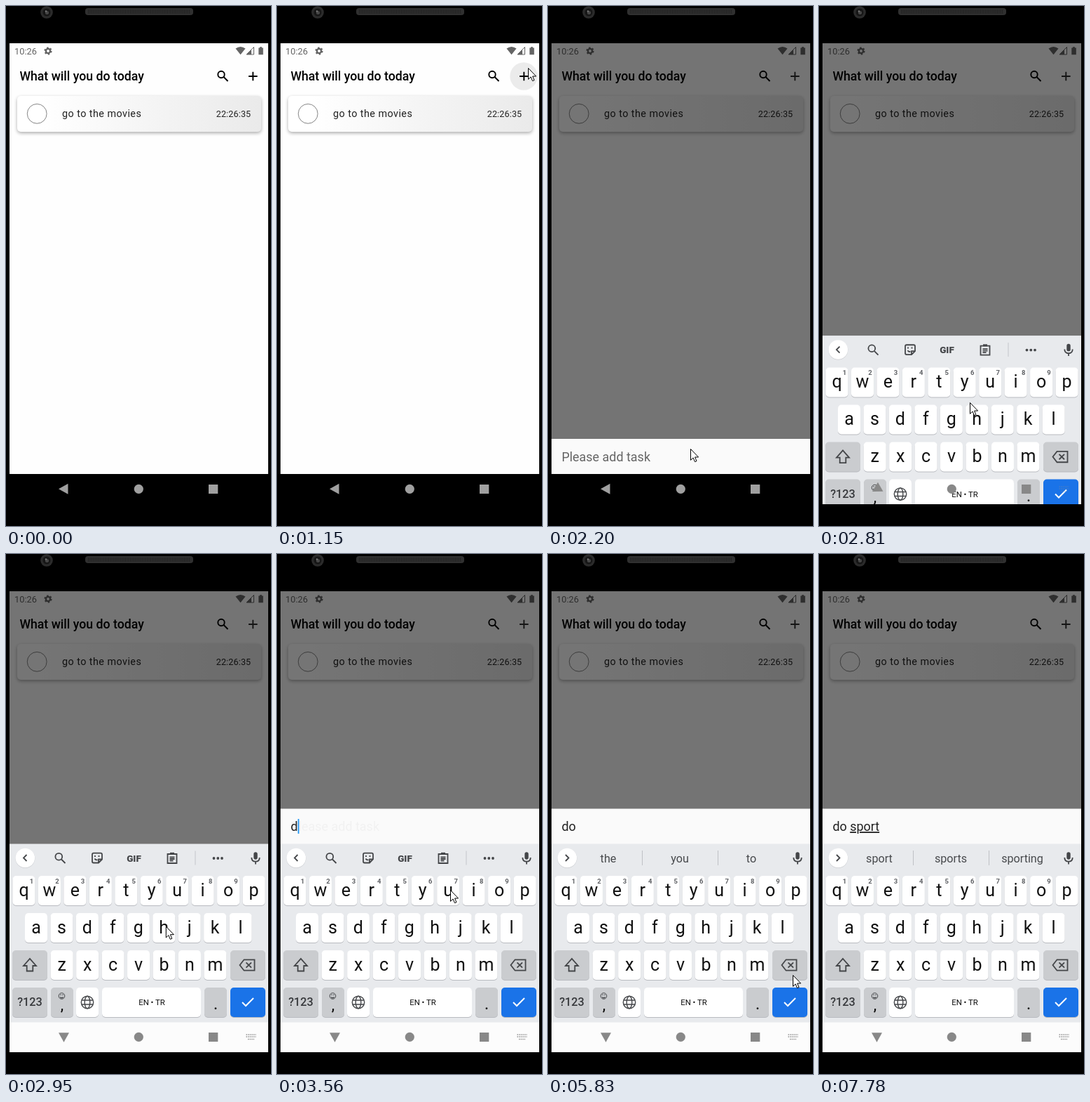
These frames come from a looping animation (378x740 px, 8000 ms). An HTML page:

```html
<!DOCTYPE html>
<html lang="en">
<head>
<meta charset="utf-8">
<title>To-do app</title>
<style>
html, body { margin: 0; width: 100%; height: 100%; overflow: hidden; background: #000; }
svg { display: block; width: 100vw; height: 100vh; }
text { font-family: Roboto, sans-serif; white-space: pre; }
.mid { text-anchor: middle; }
.line { fill: none; stroke: #444649; stroke-width: 1.8; }
.word { font-size: 16.16px; fill: #484a4d; text-anchor: middle; }
.entry { font-size: 17.96px; }
</style>
</head>
<body>
<svg viewBox="0 0 378 740">
  <defs>
    <linearGradient id="sheen">
      <stop offset=".1" stop-color="#fff"/><stop offset="1" stop-color="#eaeaea"/>
    </linearGradient>
    <filter id="soft" x="-10%" y="-40%" width="120%" height="180%"><feGaussianBlur stdDeviation="2.6"/></filter>
    <clipPath id="bar"><rect x="5" y="53" width="369" height="72"/></clipPath>
    <clipPath id="app"><rect x="5" y="53" width="369" height="613"/></clipPath>
    <clipPath id="glass"><rect x="5" y="53" width="369" height="656"/></clipPath>
  </defs>
  <rect width="378" height="740"/>

  <!-- phone body -->
  <circle cx="58" cy="9" r="8.8" fill="#2b2b2b"/>
  <circle cx="58" cy="9" r="5.5" fill="#161616"/>
  <circle cx="58.5" cy="9.5" r="2.6" fill="#454545"/>
  <circle cx="57" cy="7.5" r="1.2" fill="#777"/>
  <rect x="113" y="3" width="154" height="10" rx="4" fill="#303030"/>
  <path d="M117 6H263M117 8H263M117 10H263" stroke="#151515" stroke-dasharray="1.2 1.2"/>

  <!-- app -->
  <g clip-path="url(#app)">
    <rect x="5" y="53" width="369" height="613" fill="#fefefe"/>
    <g fill="#646464">
      <text x="12" y="68.8" font-size="12.8">10:26</text>
      <circle cx="60" cy="64" r="3.1" fill="none" stroke="#646464" stroke-width="2.4"/>
      <circle cx="60" cy="64" r="4.6" fill="none" stroke="#646464" stroke-width="2" stroke-dasharray="2.41"/>
      <path d="M327.5 60.5Q334.5 55.500 341.500 60.500L334.500 69.300Z"/>
      <path d="M353.500 58.500V69H343Z" fill="none" stroke="#646464"/>
      <path d="M350 62.500V69H343Z"/>
      <path d="M360.300 59.500H362V58.300H365V59.500H366.800V69.300H360.300Z"/>
    </g>
    <g clip-path="url(#bar)"><circle id="ripple" cx="352" cy="100"/></g>
    <text x="19.400" y="106.300" font-size="17.700" font-weight="500">What will you do today</text>
    <g fill="none" stroke="#000" stroke-width="1.900">
      <circle cx="307" cy="97.500" r="4.700"/><path d="M310.500 101L316.500 107"/>
      <path id="plus" d="M352.300 93.700V106.300M346 100H358.600"/>
    </g>
    <rect x="16" y="130" width="348" height="51" rx="5" opacity=".32" filter="url(#soft)"/>
    <rect x="16" y="128" width="348" height="51" rx="5" fill="url(#sheen)"/>
    <circle cx="44.200" cy="153.300" r="13.900" fill="none" stroke="#777" stroke-width=".9"/>
    <text x="80" y="158" font-size="14.370" letter-spacing=".45" fill="#222">go to the movies</text>
    <text x="299.700" y="157.700" font-size="12.570" letter-spacing=".15" fill="#222">22:26:35</text>
    <rect id="shade" x="5" y="53" width="369" height="613"/>
    <g id="sheet">
      <rect x="5" y="0" width="369" height="51" fill="#fafafa"/>
      <text id="hint" class="entry" x="19.400" y="31.700" fill="#666">Please add task</text>
      <text id="entry" class="entry" x="19.400" y="31.700" fill="#222"><tspan id="done"></tspan><tspan id="live" text-decoration="underline"></tspan></text>
      <rect id="caret" y="14.500" width="1.800" height="21" fill="#2196f3"/>
    </g>
  </g>

  <!-- keyboard -->
  <g clip-path="url(#glass)">
    <g id="board">
      <rect x="5" y="412.500" width="369" height="255" fill="#e8eaed"/>
      <rect x="5" y="666.500" width="369" height="43" fill="#fcfcfc"/>
      <circle cx="27.300" cy="433" r="14" fill="#ccced2"/>
      <circle cx="27.300" cy="432.500" r="13.800" fill="#fff"/>
      <path id="chevron" class="line" d="M29.500 428L25 432.500L29.500 437"/>
      <g id="tools" class="line">
        <circle cx="75.300" cy="430.700" r="4.900"/><path d="M79 434.500L84.500 440"/>
        <path d="M125 425.700H135Q137 425.700 137 427.700V434.500L132 439.500H125Q123 439.500 123 437.500V427.700Q123 425.700 125 425.700ZM132 439V434.500H136.500M126.500 433.500Q128 436.300 130.500 435"/>
        <path d="M127 429V431M132.500 429V431"/>
        <path d="M230.500 427H243.500V440H230.500ZM233.500 431.500H240.500M233.500 434H240.500M233.500 436.500H238.500"/>
        <path d="M234 426.300H240" stroke-width="3"/>
        <path d="M270 422.500V442.500" stroke="#c4c6ca" stroke-width="1"/>
        <g fill="#444649" stroke="none">
          <circle cx="296.500" cy="433" r="1.900"/><circle cx="302.300" cy="433" r="1.900"/><circle cx="308" cy="433" r="1.900"/>
          <text class="mid" x="182.500" y="437.500" font-size="13.500" font-weight="900">GIF</text>
        </g>
      </g>
      <g id="words">
        <path d="M134.500 422V443M242.500 422V443" stroke="#bfc1c5"/>
        <text class="word" x="86" y="438.700"></text>
        <text class="word" x="188" y="438.700"></text>
        <text class="word" x="290" y="438.700"></text>
      </g>
      <rect x="353.300" y="424.300" width="5.400" height="10.500" rx="2.700" fill="#444649"/>
      <path class="line" stroke-width="1.500" d="M350.300 432Q350.300 437.700 356 437.700T361.700 432M356 437.700V441.500"/>
      <g id="keys"></g>
      <path class="line" d="M34 575.800L43 586H38.300V593.500H29.700V586H25Z"/>
      <path class="line" d="M333.500 585L339.500 577.300H354.500V592.700H339.500ZM342.500 581.300L350 588.700M350 581.300L342.500 588.700"/>
      <g class="line" style="stroke-width:1.400">
        <circle cx="116" cy="638" r="8.700"/><ellipse cx="116" cy="638" rx="3.800" ry="8.700"/>
        <path d="M108 635H124M108 641H124"/>
        <circle cx="79.500" cy="629" r="4.300" stroke-width="1"/><path d="M77.300 630.500Q79.500 633 81.700 630.500M78 626.800V628M81 626.800V628"/>
      </g>
      <path d="M337 638L342 643L353 632" fill="none" stroke="#fff" stroke-width="2"/>
    </g>
    <g id="nav">
      <path id="back" d="M-7.500 0L6 -7.500V7.500Z"/>
      <circle cx="189.300" cy="687.300" r="6.600"/>
      <rect x="289" y="681" width="13.300" height="13"/>
      <path id="pad" d="M342.500 684H356.500M342.500 687H356.500M345 690.500H354" stroke="#909090" stroke-width="1.500" stroke-dasharray="1.500 1.100"/>
    </g>
  </g>

  <path id="mouse" d="M.5 .5V16.300L4.100 12.900L6.500 18.600L9 17.600L6.600 12H11.600Z" fill="#fff" stroke="#000" stroke-width="1" stroke-linejoin="round"/>
</svg>
<script>
const LOOP = 8000;
const $ = id => document.getElementById(id);
const set = (el, attrs) => { for (const k in attrs) el.setAttribute(k, attrs[k]); };
const clamp = v => Math.max(0, Math.min(1, v));
const ramp = (t, from, to) => clamp((t - from) / (to - from));
const out = (p, power) => 1 - Math.pow(1 - p, power);

function add(tag, attrs, text) {
  const el = document.createElementNS("http://www.w3.org/2000/svg", tag);
  set(el, attrs);
  if (text) el.textContent = text;
  $("keys").appendChild(el);
}

function key(x, y, w, fill = "#fff") {
  add("rect", { x, y: y + 1, width: w, height: 42, rx: 5, fill: "#b9bbc0" });
  add("rect", { x, y, width: w, height: 42, rx: 5, fill });
}

function label(x, y, size, text, weight = 400, fill = "#111") {
  add("text", { x, y, "font-size": size, "font-weight": weight, fill, class: "mid" }, text);
}

function buildKeys() {
  const grey = "#cacccf";
  [["qwertyuiop", 25.5, 458], ["asdfghjkl", 43, 511], ["zxcvbnm", 79.7, 564]].forEach(([row, x0, y], r) => {
    [...row].forEach((c, i) => {
      const x = x0 + i * 36.45;
      key(x - 16, y, 32);
      label(x, y + 28.5, 25, c);
      if (!r) label(x + 11, y + 10.5, 9.5, (i + 1) % 10, 700, "#606266");
    });
  });
  key(9, 564, 50, grey);
  key(320, 564, 50, grey);
  key(9, 617, 50, grey);
  key(64, 617, 32, grey);
  key(100, 617, 32);
  key(137, 617, 141);
  key(283, 617, 32, grey);
  key(320, 617, 50, "#1a73e8");
  label(34, 643.3, 16.3, "?123", 500, "#37393c");
  label(80, 649, 20, ",", 500);
  label(299, 648, 20, ".", 500);
  label(208, 642, 11.4, "EN • TR");
}

// bursts of screen updates: start, end, steps
const bursts = [
  [0, 0, 1], [130, 540, 6], [680, 810, 3], [950, 1700, 11], [1790, 2200, 7], [2470, 3160, 10],
  [3420, 3770, 6], [4250, 5000, 11], [5070, 5620, 8], [5760, 5830, 2], [6030, 6030, 1],
  [6230, 6230, 1], [6760, 7240, 7], [7440, 7640, 4], [7780, 7780, 1]
];

function snap(t) {
  const [a, b, n] = bursts.filter(s => s[0] <= t).pop();
  if (n < 2) return a;
  const gap = (b - a) / (n - 1);
  return a + Math.min(n - 1, Math.floor((t - a) / gap + 0.001)) * gap;
}

// pointer path: time, x, y
const path = [
  [130, 351, 698], [294, 270, 570], [376, 234, 490], [540, 258, 415], [610, 258, 415], [680, 292, 270],
  [745, 340, 54], [810, 356, 88], [950, 358, 88], [1550, 358, 88], [1700, 350, 111], [1995, 270, 400],
  [2200, 203, 630], [2470, 203, 630], [2777, 215, 564], [3160, 247, 478], [4250, 247, 478],
  [5000, 240, 616], [5300, 330, 640], [5620, 361, 603], [5760, 355, 601], [5830, 349, 599],
  [7440, 348, 600], [7600, 345, 603]
];

function pointer(t) {
  const i = path.findIndex(p => p[0] >= t);
  if (i < 1) return i ? path[path.length - 1].slice(1) : path[0].slice(1);
  const [t0, x0, y0] = path[i - 1], [t1, x1, y1] = path[i];
  const p = (t - t0) / (t1 - t0);
  return [x0 + (x1 - x0) * p, y0 + (y1 - y0) * p];
}

// typing: time, settled text, underlined text, suggestions
const typing = [
  [0, "", "", ""],
  [3420, "d", "", ""],
  [3625, "", "d", "d do did"],
  [3695, "", "do", "d do did"],
  [3765, "", "do", "do does down"],
  [5140, "do ", "", "the you to"],
  [6030, "do s", "", "the you to"],
  [6230, "do ", "s", "so some something"],
  [6760, "do ", "sp", "so some something"],
  [6840, "do ", "sp", "sp spend special"],
  [6915, "do ", "spo", "sp spend special"],
  [7000, "do ", "spor", "spot spoke spoken"],
  [7080, "do ", "sport", "spot spoke spoken"],
  [7240, "do ", "sport", "sport sports sporting"]
];

// times at which the caret turns on or off
const blinks = [2990, 4250, 4770, 5615, 6030, 7780];

function draw(time) {
  const t = snap(time);

  const grow = out(ramp(t, 940, 1350), 2);
  set($("ripple"), { r: 31.4 * grow, opacity: 0.075 * ramp(t, 900, 1050) * (1 - ramp(t, 1500, 1700)) });
  const open = ramp(t, 1350, 1600);
  set($("shade"), { opacity: 0.54 * out(open, 1.67) });
  set($("plus"), { stroke: t < 1350 ? "#000" : "#2e2e2e" });

  const lifted = t > 2990;
  const sheetY = lifted ? 362.5 : 666 - 50 * out(open, 2);
  set($("sheet"), { transform: `translate(0 ${sheetY})` });

  const rise = out(ramp(t, 2620, 2934), 2.4);
  set($("board"), { transform: `translate(0 ${297 * (1 - rise)})` });
  const turn = ramp(t, 2720, 2890);
  set($("back"), { transform: `translate(82.500 687.300) rotate(${-90 * turn})` });
  set($("nav"), { fill: turn > 0 ? "#888" : "#a0a0a0" });
  set($("pad"), { opacity: turn });

  const [, done, live, words] = typing.filter(s => s[0] <= t + 1).pop();
  $("done").textContent = done;
  $("live").textContent = live;
  set($("hint"), { opacity: t < 3419 ? 1 : t < 3480 ? 0.5 : t < 3550 ? 0.2 : t < 3600 ? 0.05 : 0 });
  const on = blinks.filter(b => b <= t).length % 2;
  const width = done + live ? $("entry").getComputedTextLength() : 0;
  set($("caret"), { x: 19.6 + width, opacity: on });

  set($("tools"), { visibility: words ? "hidden" : "visible" });
  set($("words"), { visibility: words ? "visible" : "hidden" });
  set($("chevron"), { transform: words ? "matrix(-1 0 0 1 54.500 0)" : "" });
  const list = words.split(" ");
  document.querySelectorAll(".word").forEach((el, i) => { el.textContent = list[i] || ""; });

  const [x, y] = pointer(t);
  set($("mouse"), { transform: `translate(${x} ${y})`, visibility: t < 130 || t > 7630 ? "hidden" : "visible" });
}

buildKeys();
const start = performance.now();
function frame() {
  draw((performance.now() - start) % LOOP);
  requestAnimationFrame(frame);
}
frame();
</script>
</body>
</html>
```
